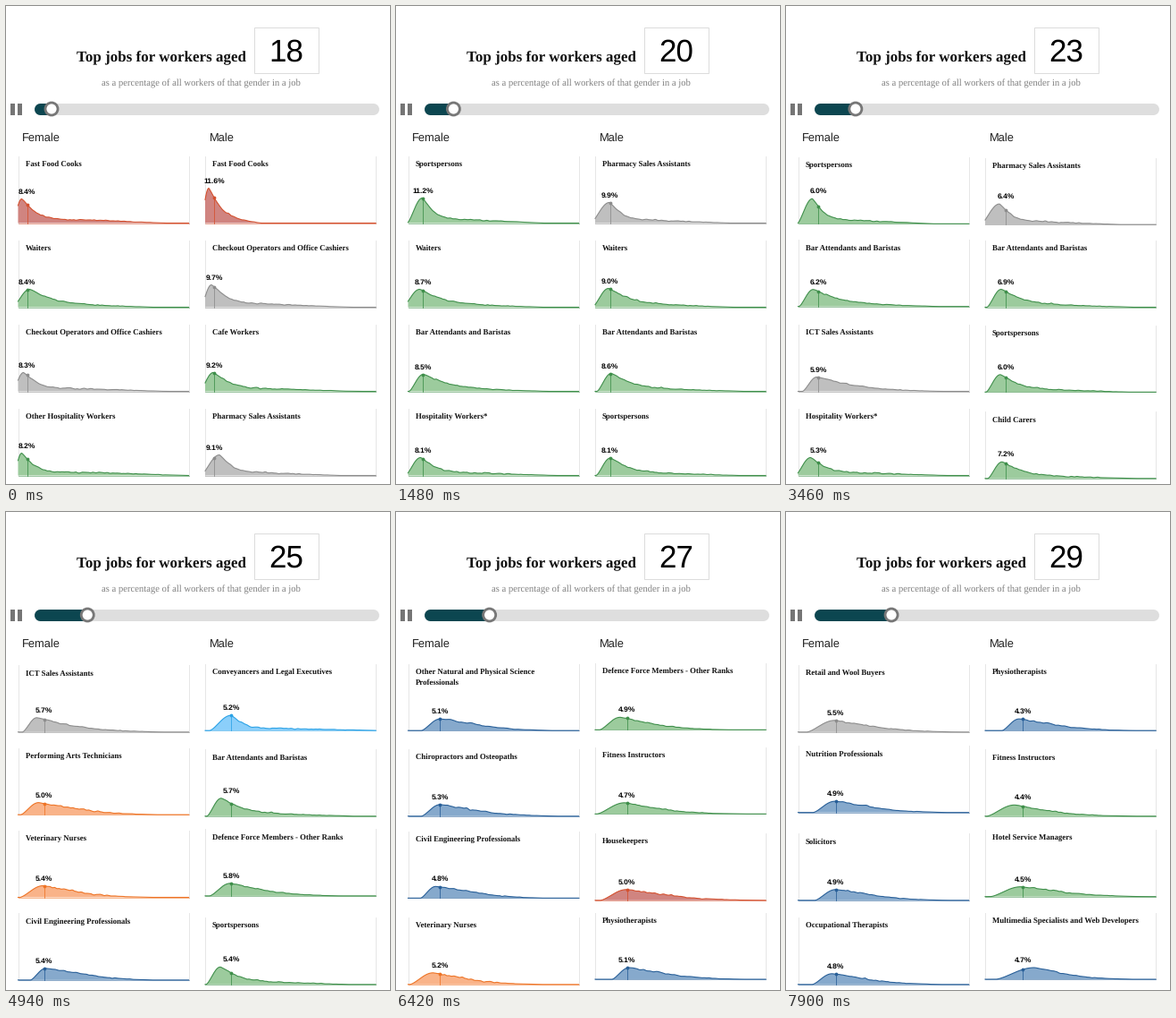
A matplotlib script that plays this animation: 430 px wide and 534 px high, repeating every 8 s.

```python
import numpy as np
import matplotlib.pyplot as plt
from matplotlib.animation import FuncAnimation
from matplotlib.patches import Circle, Rectangle
from matplotlib.transforms import Affine2D

W, H, DPI = 430, 534, 100
TICK, LOOP = 20, 8000
FIRST_AGE, FIRST_MOVE, YEAR_MS, STEP_MS = 18, 500, 740, 120
ROW_TOP, ROW_GAP, BASE, WIDTH = 168, 94, 74.5, 191
PX = 72 / DPI

# line and fill colours of the job groups
COLORS = {
    "red": ("#d4502e", "#d08480"),
    "green": ("#3f8f4b", "#9ccb9d"),
    "grey": ("#8c8c8c", "#bfbfbf"),
    "blue": ("#285f98", "#86a9cc"),
    "orange": ("#ee7426", "#f9b389"),
    "sky": ("#2ba2e6", "#8bcffa"),
}

# colour, (rise start, peak x, peak height, decay width, end)
FEMALE = {
    "Fast Food Cooks": ("red", (-6, 4, 27, 16, 165)),
    "Waiters": ("green", (-6, 13, 20, 26, 150)),
    "Checkout Operators and Office Cashiers": ("grey", (-6, 6, 21, 16, 165)),
    "Other Hospitality Workers": ("green", (-5, 4, 25, 14, 185)),
    "Sportspersons": ("green", (-1, 16, 28, 13, 150)),
    "Hospitality Workers*": ("green", (-3, 14, 20, 18, 165)),
    "Sports Coaches, Instructors and Officials": ("green", (-5, 12, 19, 17, 165)),
    "Bar Attendants and Baristas": ("green", (1, 17, 19, 29, 155)),
    "ICT Sales Assistants": ("grey", (5, 21, 16, 40, 160)),
    "Performing Arts Technicians": ("orange", (3, 23, 13.5, 48, 155)),
    "Veterinary Nurses": ("orange", (2, 28, 13, 45, 145)),
    "Civil Engineering Professionals": ("blue", (14, 31, 13, 55, 150)),
    "Other Natural and Physical Science\nProfessionals":
        ("blue", (15, 36, 13, 52, 160)),
    "Chiropractors and Osteopaths": ("blue", (15, 36, 13, 50, 165)),
    "Retail and Wool Buyers": ("grey", (10, 41, 13, 52, 175)),
    "Nutrition Professionals": ("blue", (17, 41, 12.5, 50, 165)),
    "Solicitors": ("blue", (19, 42, 12, 52, 165)),
    "Occupational Therapists": ("blue", (16, 38, 12, 48, 160)),
}
MALE = {
    "Fast Food Cooks": ("red", (-5, 4, 39, 13, 62)),
    "Checkout Operators and Office Cashiers": ("grey", (-5, 7, 25, 18, 160)),
    "Cafe Workers": ("green", (-6, 9, 21, 19, 165)),
    "Pharmacy Sales Assistants": ("grey", (-5, 16, 23, 14, 150)),
    "Waiters": ("green", (-3, 15, 21, 24, 155)),
    "Education Professionals*": ("blue", (4, 13, 20, 9, 190)),
    "Bar Attendants and Baristas": ("green", (2, 18, 20, 24, 165)),
    "Sportspersons": ("green", (1, 17, 19.5, 22, 160)),
    "Child Carers": ("green", (3, 19, 18.5, 23, 165)),
    "Conveyancers and Legal Executives": ("sky", (5, 29, 17, 14, 195)),
    "Defence Force Members - Other Ranks": ("green", (5, 28, 14, 40, 150)),
    "Fitness Instructors": ("green", (2, 33, 12.5, 43, 160)),
    "Housekeepers": ("red", (6, 35, 12, 55, 175)),
    "Physiotherapists": ("blue", (19, 38, 13, 48, 165)),
    "Hotel Service Managers": ("green", (6, 40, 11, 55, 175)),
    "Multimedia Specialists and Web Developers": ("blue", (12, 55, 13, 43, 165)),
}

# one line per age: job prefix and share, best first
FEMALE_RANKS = """
Fast 8.4, Wait 8.4, Check 8.3, Other_H 8.2
Sportsp 10.6, Wait 9.3, Hosp 8.5, Sports_C 8.5
Sportsp 11.2, Wait 8.7, Bar 8.5, Hosp 8.1
Sportsp 10.7, Bar 8.2, Wait 7.7, Hosp 7.4
Sportsp 8.3, Bar 7.3, ICT 6.5, Hosp 6.4
Bar 6.2, Sportsp 6.0, ICT 5.9, Hosp 5.3
ICT 5.7, Perf 5.6, Vet 5.5, Civil 5.4
Chiro 5.6, Civil 5.4, Vet 5.4, Perf 5.0
Other_N 5.5, Chiro 5.3, Civil 5.2, Vet 5.2
Nutr 5.3, Retail 5.2, Other_N 5.1, Civil 4.8
Retail 5.5, Nutr 5.1, Solic 4.9, Occ 4.8
Nutr 4.9
"""
MALE_RANKS = """
Fast 11.6, Check 9.7, Cafe 9.2, Pharm 9.1
Pharm 9.8, Wait 9.1, Cafe 8.2, Educ 8.1
Pharm 9.9, Wait 9.0, Bar 8.6, Sports 8.1
Pharm 9.5, Bar 8.8, Wait 8.6, Sports 8.2
Pharm 8.1, Bar 7.9, Sports 7.4, Child 7.2
Conv 7.0, Bar 6.9, Pharm 6.4, Sports 6.0
Conv 6.5, Bar 5.7, Def 5.6, Sports 5.4
Def 5.8, Fit 5.4, Conv 5.2, House 5.1
Def 5.4, Fit 5.2, House 5.0, Phys 4.9
Phys 5.1, Def 4.9, Fit 4.7, Hotel 4.6
Phys 4.8, Fit 4.4, Hotel 4.4, Multi 4.4
Multi 4.7, Hotel 4.5, Phys 4.3
"""

plt.rcParams.update({"text.hinting": "none", "savefig.dpi": DPI})
fig = plt.figure(figsize=(W / DPI, H / DPI), dpi=DPI, facecolor="white")
ax = fig.add_axes([0, 0, 1, 1])
ax.set_xlim(0, W)
ax.set_ylim(H, 0)
ax.axis("off")


def write(x, y, s, size, family, **kw):
    return ax.text(x, y, s, fontsize=size * PX, family=family, **kw)


def stroke(xs, ys, color, width, **kw):
    return ax.plot(xs, ys, color=color, lw=width * PX, **kw)[0]


def profile(rise, peak, height, decay, end, seed):
    """Skewed hump with a thin, bumpy tail."""
    x = np.arange(WIDTH + 1.0)
    up = np.clip((x - rise) / (peak - rise), 0, 1)
    left = height * np.sin(np.pi / 2 * up) ** 1.5
    tail = 0.14 * height
    right = tail + (height - tail) * np.exp(-(np.maximum(x - peak, 0) / decay) ** 1.25)
    y = np.where(x < peak, left, right)
    noise = np.random.default_rng(seed).normal(size=x.size)
    noise = np.convolve(noise, np.hanning(7) / 3, "same")
    y += 0.65 * noise * np.clip((x - peak) / 12, 0, 1)
    return x, np.maximum(y * np.clip((end - x) / (0.55 * end), 0, 1), 0)


class Panel:
    def __init__(self, left, title, color, shape, seed):
        dark, light = COLORS[color]
        self.left = left
        self.x, self.h = profile(*shape, seed)
        self.peak = BASE - self.h.max()
        self.move = Affine2D()
        kw = {"transform": self.move + ax.transData}
        xs, ys = left + self.x, BASE - self.h
        edges = [stroke([x, x], [0, BASE], "#e4e4e4", 0.9, zorder=1, **kw)
                 for x in (left, left + WIDTH)]
        area = ax.fill(np.r_[xs, xs[-1], xs[0]], np.r_[ys, BASE, BASE],
                       color=light, lw=0, zorder=2, **kw)[0]
        base = stroke([left, left + WIDTH], [BASE, BASE], dark, 0.5, zorder=3, **kw)
        line = stroke(xs, ys, dark, 1.1, zorder=3, **kw)
        name = write(left + 8, 5, title, 8.8, "Liberation Serif", va="top",
                     weight="bold", color="#111111", linespacing=1.65, **kw)
        self.stem = stroke([], [], dark, 0.8, zorder=4, **kw)
        self.dot = stroke([], [], dark, 0, marker="o", ms=3.8 * PX, mew=0,
                          zorder=5, **kw)
        self.label = write(0, self.peak - 6, "", 8.5, "Liberation Sans",
                           weight="bold", ha="center", color="black", **kw)
        self.parts = edges + [area, base, line, name, self.stem, self.dot, self.label]
        self.hide()

    def hide(self):
        for part in self.parts:
            part.set_visible(False)

    def show(self, slot, age, share):
        for part in self.parts:
            part.set_visible(True)
        self.move.clear().translate(0, ROW_TOP + ROW_GAP * slot)
        dx = (age - 15) * 3.2 + 0.5
        x, y = self.left + dx, BASE - np.interp(dx, self.x, self.h)
        self.stem.set_data([x, x], [y, BASE])
        self.dot.set_data([x], [y])
        self.label.set_x(x)
        self.label.set_text(f"{share}%")


class Column:
    def __init__(self, left, jobs, ranks, seed):
        self.panels = {t: Panel(left, t, color, shape, seed + i)
                       for i, (t, (color, shape)) in enumerate(jobs.items())}
        self.years = [self.parse(row) for row in ranks.strip().splitlines()]

    def parse(self, row):
        year = {}
        for item in row.split(", "):
            key, share = item.split()
            key = key.replace("_", " ")
            title = next(t for t in self.panels if t.startswith(key))
            year[title] = (len(year), share)
        return year

    def draw(self, i, j, p):
        old, new = self.years[i], self.years[j]
        for title, panel in self.panels.items():
            if title not in old and title not in new:
                panel.hide()
                continue
            # jobs outside the top four wait four rows lower
            start = old[title][0] if title in old else new[title][0] + 4
            stop = new[title][0] if title in new else old[title][0] + 4
            share = (new if title in new else old)[title][1]
            panel.show(start + (stop - start) * p, FIRST_AGE + i + (j - i) * p, share)


# header
write(79, 62, "Top jobs for workers aged", 17, "Liberation Serif",
      weight="bold", color="#111111")
write(107, 89.5, "as a percentage of all workers of that gender in a job", 10.6,
      "Liberation Serif", color="#808080")
ax.add_patch(Rectangle((277.5, 23.5), 72, 51, fc="white", ec="#dcdcdc", lw=PX))
age_text = write(313.5, 61.7, "", 35, "Liberation Sans", ha="center", color="black")
write(17.5, 151, "Female", 12.9, "Liberation Sans", color="#222222")
write(227.5, 151, "Male", 12.9, "Liberation Sans", color="#222222")

# slider
for x in (5.3, 12.8):
    ax.add_patch(Rectangle((x, 109), 4.8, 12.5, fc="#757575", lw=0))
stroke([37.5, 410.5], [115, 115], "#dedede", 13, solid_capstyle="round")
done = stroke([], [], "#0c4650", 13, solid_capstyle="round", zorder=3)
thumb = ax.add_patch(Circle((0, 115), 7, fc="white", ec="#777777",
                            lw=2.8 * PX, zorder=4))

columns = [Column(13.5, FEMALE, FEMALE_RANKS, 10),
           Column(223, MALE, MALE_RANKS, 60)]


def ease(t):
    t = min(t, 1)
    return 4 * t ** 3 if t < 0.5 else 1 - 4 * (1 - t) ** 3


def draw(frame):
    ms = frame * TICK - FIRST_MOVE
    if ms < 0:
        i = j = 0
        p = 1
    else:
        i, rest = divmod(ms, YEAR_MS)
        j = i + 1
        p = ease(0.13 + 0.46 * (rest // STEP_MS))
    for column in columns:
        column.draw(i, j, p)
    x = 51 + 6.7 * (i + (j - i) * p)
    done.set_data([37.5, x], [115, 115])
    thumb.center = (x, 115)
    age_text.set_text(str(FIRST_AGE + j))
    return []


anim = FuncAnimation(fig, draw, frames=LOOP // TICK, interval=TICK,
                     init_func=lambda: draw(0), repeat=True, repeat_delay=0,
                     cache_frame_data=False)
plt.show()
```
